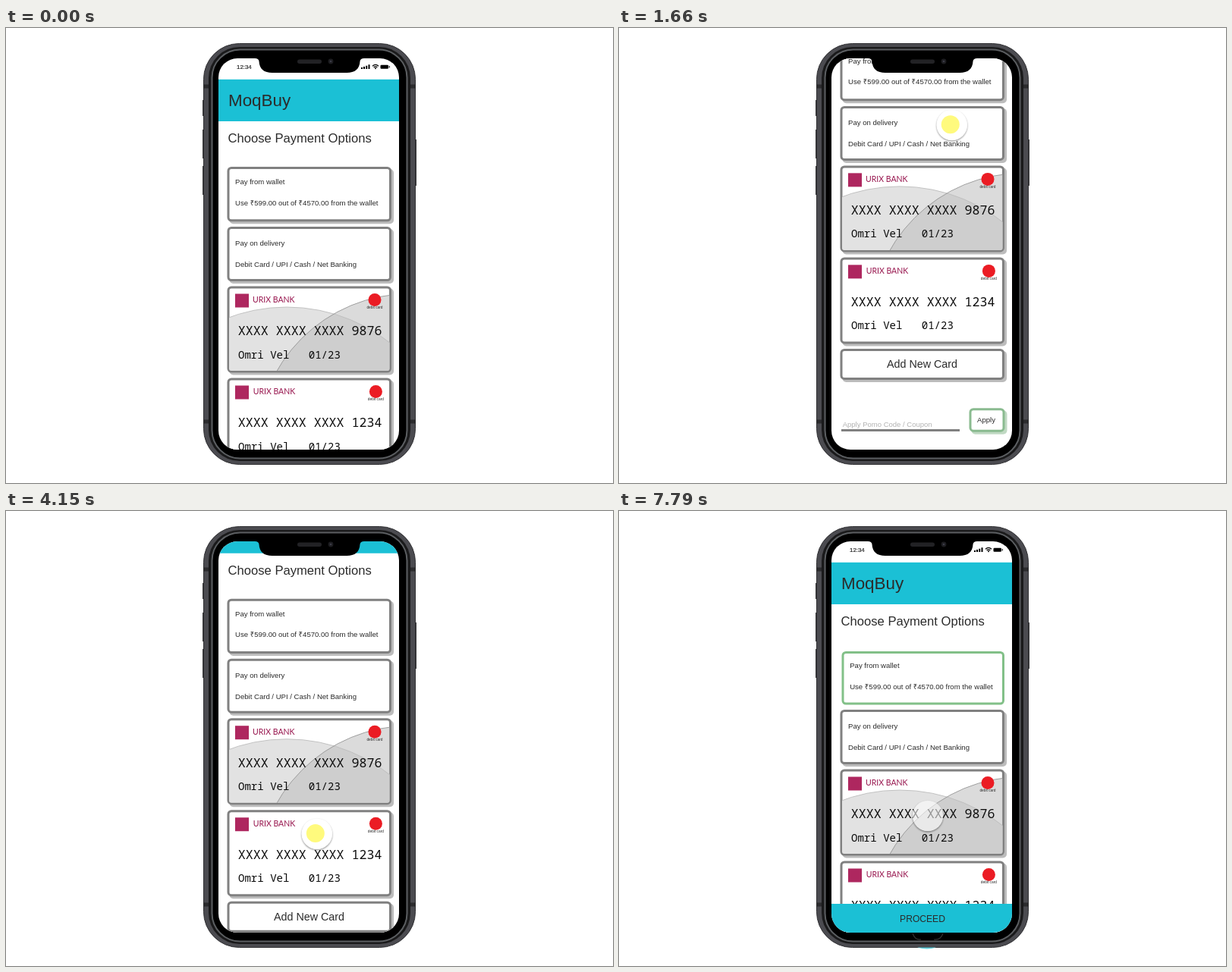
An HTML page for the animation above (8000 ms loop, 800 by 600 pixels).

```html
<!DOCTYPE html>
<html lang="en">
<head>
<meta charset="utf-8">
<title>Payment options</title>
<style>
html, body { margin: 0; width: 100%; height: 100%; overflow: hidden; background: #fff; }
svg { display: block; width: 800px; height: 600px; }
text { font-family: "Liberation Sans", Arial, sans-serif; font-size: 9.57px; fill: #2b2b2b; white-space: pre; }
.mono { font-family: "Noto Sans Mono", monospace; fill: #0c0c0c; }
.bank { font-family: Lato, sans-serif; font-size: 10.5px; fill: #97144d; }
</style>
</head>
<body>
<svg viewBox="0 0 800 600">
  <defs>
    <clipPath id="screen"><rect x="280" y="40" width="238" height="516" rx="25"/></clipPath>
    <clipPath id="cardArea"><rect x="294" y="342.5" width="211.5" height="109.5" rx="3"/></clipPath>
    <filter id="soft" x="-30%" y="-30%" width="160%" height="160%">
      <feGaussianBlur stdDeviation="1.1"/>
    </filter>
    <mask id="ring">
      <rect x="-30" y="-30" width="60" height="60" fill="#fff"/>
      <circle r="20" fill="#000"/>
    </mask>
  </defs>

  <path d="M261 95v21M261 134v38M261 182v38M539 147v61" stroke="#3a3a3d" stroke-width="4"/>
  <rect x="260.5" y="20.5" width="279" height="555" rx="47" fill="#4b4b50" stroke="#303033"/>
  <path d="M260 77h7M260 519h7M533 77h7M533 519h7" stroke="#2b2b2d" stroke-width="5"/>
  <rect x="267" y="25" width="266" height="546" rx="41" fill="#1a1a1b"/>
  <rect x="271.5" y="28.5" width="257" height="539" rx="37" fill="#000" stroke="#5c5f62" stroke-width="2"/>

  <g clip-path="url(#screen)">
    <rect x="280" y="40" width="238" height="516" fill="#fff"/>
    <g id="page"></g>
    <g id="proceed">
      <rect x="280" y="518" width="238" height="38" fill="#1bc0d5"/>
      <text x="400" y="541.6" text-anchor="middle" style="font-size:12.1px">PROCEED</text>
    </g>
  </g>
  <path d="M328 38V40Q333 40 333.5 44C334 54 340 59 351 59H449C460 59 466 54 466.5 44Q467 40 472 40V38Z"/>
  <rect x="384" y="41.5" width="32" height="5.5" rx="2.7" fill="#222225"/>
  <circle cx="428" cy="44" r="3.4" fill="#1d1d20"/>
  <circle cx="428" cy="44" r="1.3" fill="#3c3c48"/>

  <g id="trace">
    <path d="M387 557Q390 566 398 565M427 557Q424 566 415 565" fill="none" stroke="#333" stroke-width="1.2"/>
    <path d="M393 575.5H418Q406 579.5 393 575.5Z" fill="#5fd3e2"/>
  </g>

  <g id="cursor">
    <g mask="url(#ring)"><circle cy="1.2" r="20.2" opacity=".45" filter="url(#soft)"/></g>
    <circle id="disc" r="20.3" fill="#fff"/>
    <circle id="dot" cx="-2" cy="-.6" r="12" fill="#fffa7d"/>
  </g>
</svg>

<script>
const $ = id => document.getElementById(id);
const label = (x, y, s, size = 9.57, extra = "") =>
  `<text x="${x}" y="${y}" style="font-size:${size}px" ${extra}>${s}</text>`;
const centred = 'text-anchor="middle"';

const box = (y, h, x = 291.5, w = 216.5, line = "#808080", shadow = "#bcbcbc") =>
  `<rect x="${x + 3}" y="${y + 3}" width="${w}" height="${h}" rx="5" fill="${shadow}"/>
  <rect x="${x + 1.5}" y="${y + 1.5}" width="${w - 3}" height="${h - 3}" rx="4" fill="#fff" stroke="${line}" stroke-width="3"/>`;

const wallet = (x, y) => label(x, y, "Pay from wallet") +
  label(x, y + 27.6, "Use ₹599.00 out of ₹4570.00 from the wallet");

const bankCard = (y, digits, dx, art = "") => box(y, 114) + art +
  `<rect x="302" y="${y + 10}" width="18" height="18" fill="#ae275f"/>
  <text class="bank" x="${325 + dx / 2}" y="${y + 21.8}">URIX BANK</text>
  <circle cx="${486 + dx}" cy="${y + 18}" r="8.5" fill="#eb1c24"/>` +
  label(486 + dx, y + 29.6, "debit card", 4.8, centred) +
  label(305.8, y + 64.5, "XXXX XXXX XXXX " + digits, 16.65, 'class="mono"') +
  label(306, y + 95, "Omri Vel   01/23", 14.06, 'class="mono"');

const arcs = `<g clip-path="url(#cardArea)" stroke-width=".8">
  <circle cx="370" cy="588" r="220" fill="#e2e2e2" stroke="#b8b8b8"/>
  <circle cx="532" cy="552" r="201.5" fill="#bebebe" fill-opacity=".55" stroke="#8f8f8f"/></g>`;

const status = label(304, 53.8, "12:34", 7.9, 'stroke="#000" stroke-width=".15"') +
  `<path d="M469 54v-2M472 54v-3M475.2 54v-4.2M478.5 54v-5.8" stroke="#000" stroke-width="2"/>
  <path d="M483 50.2Q487 46.6 491 50.2M484.7 52Q487 49.8 489.3 52" fill="none" stroke="#000" stroke-width="1.3"/>
  <circle cx="487" cy="53.2" r="1"/>
  <rect x="493.5" y="48.8" width="10.5" height="5" rx="1.2"/>
  <path d="M505.3 50v2.5" stroke="#000"/>`;

$("page").innerHTML = status +
  `<rect x="280" y="67.8" width="238" height="55.2" fill="#1bc0d5"/>` +
  label(293, 102.8, "MoqBuy", 22.4) +
  label(292.6, 151, "Choose Payment Options", 16.6) +
  `<g id="idle">${box(183, 72.3) + wallet(302, 206)}</g>` +
  `<g id="picked">${box(185, 70.5, 293.5, 214.5, "#82c088", "none") + wallet(304.2, 207.4)}</g>` +
  box(262, 72) + label(302, 287.3, "Pay on delivery") +
  label(302, 314.9, "Debit Card / UPI / Cash / Net Banking") +
  bankCard(340.5, 9876, 0, arcs) + bankCard(461.5, 1234, 1.4) +
  box(582, 41) + label(399.5, 607.6, "Add New Card", 14.3, centred) +
  label(294.7, 685.4, "Apply Pomo Code / Coupon", 9.52, 'fill-opacity=".36"') +
  `<path d="M293 689.7H449" stroke="#808080" stroke-width="3"/>` +
  box(660.3, 31.5, 461.5, 47, "#8abb90", "#c0d9c3") + label(472, 679.4, "Apply");

// Gestures run one after another; a drag takes the page along with the pointer.
const move = (from, to, x, y, drag = false) => ({ from, to, x, y, drag });
const gestures = [
  move(70, 680, 451, 287),
  move(680, 1830, 438, 118, true),
  move(2350, 3120, 406, 375),
  move(3200, 3600, 415, 324),
  move(3650, 4400, 408, 461, true),
  move(4400, 4750, 398, 220),
  move(4750, 4840, 387, 206),
  move(5680, 6470, 367, 300),
  move(6550, 6980, 406, 557),
  move(7080, 7330, 368, 508),
  move(7330, 7790, 407, 402),
];
const between = (t, a, b) => t >= a && t < b;

function ease(t, from, to) {
  const p = Math.min(1, Math.max(0, (t - from) / (to - from)));
  return p * p * (3 - 2 * p);
}

function pose(t) {
  let x = 638, y = 555, scroll = 0;
  for (const g of gestures) {
    const p = ease(t, g.from, g.to), dy = (g.y - y) * p;
    x += (g.x - x) * p;
    y += dy;
    if (g.drag) scroll -= dy;
    if (p < 1) break;
  }
  return { x, y, scroll: scroll * (1 - ease(t, 5340, 5460)) };
}

const show = (id, on) => $(id).setAttribute("display", on ? "inline" : "none");
const place = (id, x, y) => $(id).setAttribute("transform", `translate(${x} ${y})`);

function draw(now) {
  const t = now % 8000, { x, y, scroll } = pose(t);
  const pressed = gestures.some(g => g.drag && between(t, g.from, g.to)) ||
    between(t, 4900, 5240) || between(t, 6980, 7080);
  place("page", 0, -scroll);
  place("cursor", x, y);
  show("cursor", t >= 70);
  show("dot", pressed);
  $("disc").setAttribute("opacity", pressed ? .92 : .56);
  show("idle", t < 5080);
  show("picked", t >= 5080);
  show("proceed", t >= 5380);
  show("trace", t >= 7080);
  requestAnimationFrame(draw);
}
draw(performance.now());
</script>
</body>
</html>
```
